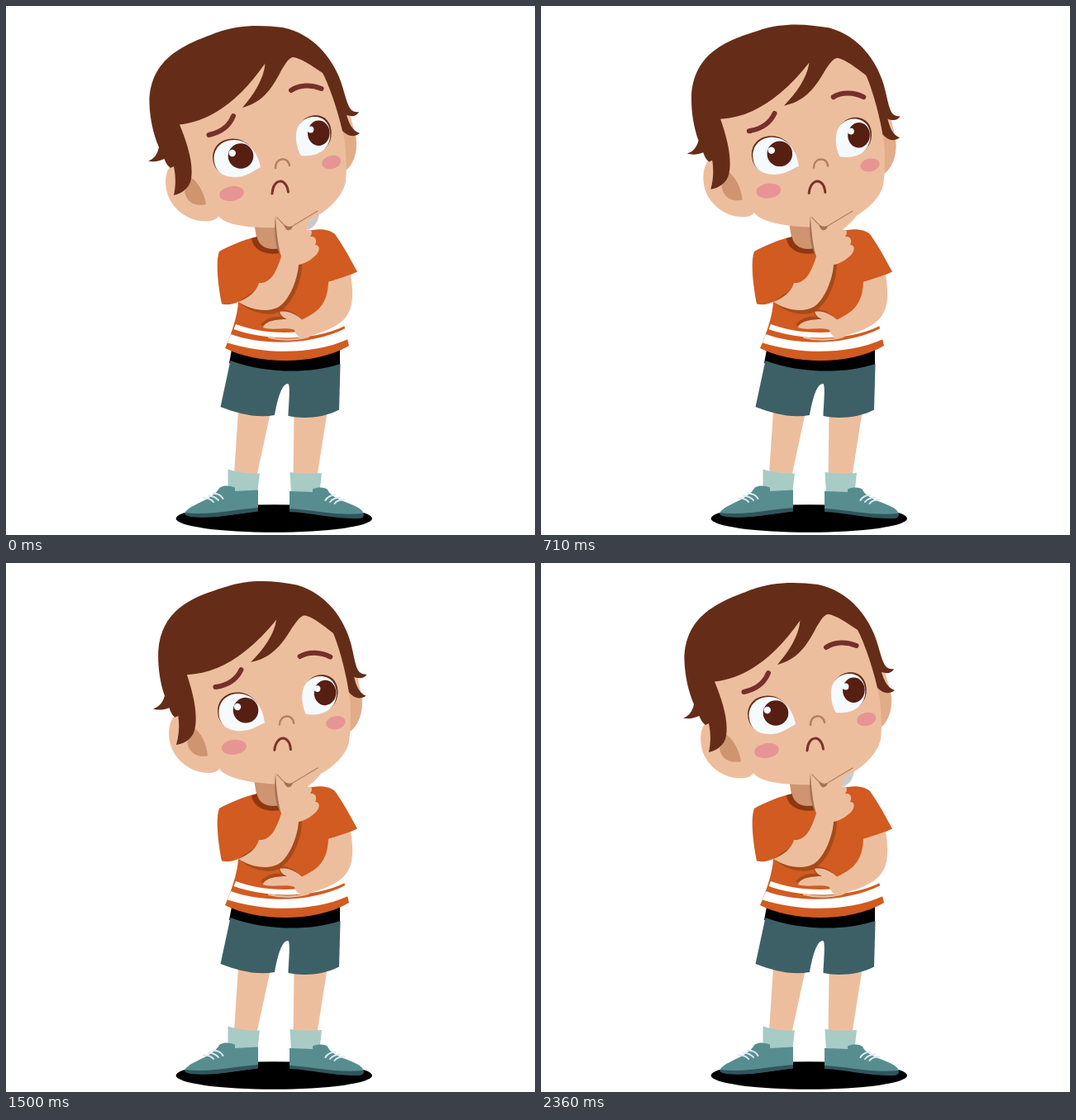
Animation, 640 px wide and 640 px high, one loop 2.43 s. Source, as an HTML page:

```html
<!DOCTYPE html>
<html lang="en">
<head>
<meta charset="utf-8">
<title>Thinking boy</title>
<style>
html, body { margin: 0; width: 100%; height: 100%; overflow: hidden; background: #fff; }
svg { display: block; width: 100vw; height: 100vh; }
.skin { fill: #edbe9e; }
.deep { fill: #cf9470; }
.hair { fill: #652d18; }
.shirt { fill: #d15b21; }
.shade { fill: #a64a1a; }
.white { fill: #fff; }
.eye { fill: #f5fafe; }
.iris { fill: #561f12; }
.cheek { fill: #e79594; }
.sock { fill: #a8cbc5; }
.shoe { fill: #588d8f; }
.sole { fill: #31545c; }
.line { fill: none; stroke-linecap: round; }
.brow { stroke: #75302a; stroke-width: 6; }
</style>
</head>
<body>
<svg viewBox="0 0 640 640">
  <defs>
    <path id="leftEye" d="M251.500 184C252 170 263 162 276 162C292 162 304 175 308 195C300 199 291 207 277 207C262 207 252 200 251.500 184Z"/>
    <path id="rightEye" d="M357 181C351 172 347 150 357 141C365 132 380 132 387 140C394 148 394 163 387 171C380 180 368 182 357 181Z"/>
  </defs>
  <ellipse cx="324.300" cy="620" rx="118.700" ry="16.800"/>

  <g id="legs">
    <path class="skin" d="M281 490L319.500 494L303.500 568L276 566ZM348.500 494L388.500 492L376.500 568L347.500 568Z"/>
    <path class="sock" d="M268.500 560.500Q285 566 307 565.500L304 590L268.500 588ZM343.500 564Q362 567 382 565L379 592L345 590Z"/>
    <path class="shoe" d="M216 614C221 603 246 600 257 585C259 580 268 579 277 582.500L277 587L305 585.500V611C280 614 250 621 224 617Z"/>
    <path class="sole" d="M215.500 613C245 617 275 609 305 607V611.500C280 614 250 621 224 618Q216 617 215.500 613Z"/>
    <path class="shoe" d="M343 587L371 588V584.500C378 581.500 386 582 389 585C394 598 420 601 429 609C433 612 434 617 430 619C400 621 370 612 343 611Z"/>
    <path class="sole" d="M343 608C375 610 400 617 432.500 614Q434 619 428 620C398 621 370 613 343 612Z"/>
    <path class="line" stroke="#dce9f2" stroke-width="2" d="M239 595.500Q247 595 251 600M245 592.500Q253 593 257 598M250 589.500Q259 590 262.500 596M409.500 597.500Q401 597 397.500 602M404 594.500Q396 595 392 600M398.500 591.500Q390 592 386.500 598"/>
    <path d="M273 416H404V438C360 448 310 444 270 432Z"/>
    <path fill="#3d6067" d="M271.500 429C312 444 365 446 404.500 433L403 488.500C385 498 360 500 341.500 496C342 482 344.500 457 341 457C333 457 328 478 325 495C302 499 281 493 259.500 485Z"/>
  </g>

  <g id="body">
    <path class="deep" d="M300 262H338V298C325 299 310 297 305 292Z"/>
    <path class="shirt" d="M258 297C272 289 288 283 300 280C304 296 318 299 332 296L362 273C378 268 392 270 398 276C408 290 416 305 425 321.500C414 327 402 331 390 334C392 350 400 365 407 377L415 411C370 437 300 432 265 414C272 398 280 376 281 358C275 361 268 362 261 360.500C257 340 253 310 258 297Z"/>
    <path fill="#8e3710" d="M297 281C299 296 315 302 332 299L331 293C318 296 306 292 303.500 279Z"/>
    <path class="white" d="M278 385C310 397 365 402 408 378L410 387C370 407 310 404 275.500 391ZM272 397C310 411 370 411 411.500 389.500L414 403C370 423 310 421 268 407.500Z"/>
  </g>

  <g id="lowerArm">
    <path class="shade" d="M308 386C314 377 325 375 333 376L327 366.500C340 366 351 371 358 380L340 390Z"/>
    <path class="line" stroke="#edbe9e" stroke-width="2" d="M318 401Q342 407 366 400"/>
    <path class="skin" d="M390 334L417 325C421 350 420 367 409 379C396 392 377 396 362 401C353 402 350 396 349 392C338 388 320 393 311 389C313 381 328 379 340 379C335 377 332 374 331 370C341 368 351 373 358 379.500C376 371 389 362 390 334Z"/>
  </g>

  <path id="rim" fill="#c8cbcc" d="M378.500 245C380 255 376 266 367 270H355L360 250Z"/>

  <g id="head">
    <path class="skin" d="M203 190C193 197 192 210 194 222C198 244 218 258 235 260C246 261 254 260 257 254C266 267 305 269 330 268C372 266 406 237 411 213L412 198C422 190 427 170 422 153L405 90L340 45L210 120Z"/>
    <path fill="#e2ac88" d="M406 148L422 153C427 170 422 190 412 198C411 184 412 166 406 148Z"/>
    <path class="deep" d="M223 207C232 212 240 226 242 240C229 243 219 238 216 225Z"/>
    <path class="hair" d="M203 229C206 215 205 204 203 194L199 196C195 193 193 189 191.500 185C185 188 179 189 172 187.500C179 185 183 180 185 171C178 155 174 135 173.500 118C173 62 219 46 250 34C280 22 308 23 335 26C373 34 394 64 403 86C410 104 412 120 418 126Q422 129 427 128C424 134 418 134 412 132C415 142 419 151 428 154C420 160 413 157 407 151C402 128 391 96 383 81C370 72 356 63 348 62C342 62 338 70 333 78C321 102 309 117 286 123C300 107 312 88 313.500 69.500C281 116 246 140 210 143.500C219 165 227 190 224 209C222 221 212 227 203 229Z"/>
    <use href="#leftEye" class="hair" x="-1.500" y="-1.500"/>
    <use href="#rightEye" class="hair" x="1.500" y="-1.800"/>
    <use href="#leftEye" class="eye"/>
    <use href="#rightEye" class="eye"/>
    <ellipse class="iris" cx="284" cy="181.500" rx="15.300" ry="15.300"/>
    <ellipse class="iris" cx="378.300" cy="153.700" rx="13.300" ry="15.200"/>
    <circle class="eye" cx="273.800" cy="178" r="4.200"/>
    <circle class="eye" cx="368.500" cy="149.500" r="3.900"/>
    <path class="line brow" d="M245.500 156C259 153 270 146 275 133"/>
    <path class="line brow" id="rightBrow" d="M345 102C355 95 370 95 381.500 100"/>
    <path class="line" stroke="#ba7e63" stroke-width="2.500" d="M326 196C325 184 341 181 343 193"/>
    <path class="line" stroke="#7a342b" stroke-width="3" d="M322 227C323 208 339 207 341.500 225"/>
    <ellipse class="cheek" cx="273" cy="227" rx="15" ry="9" transform="rotate(-10 273 227)"/>
    <ellipse class="cheek" cx="393.700" cy="189" rx="11.800" ry="8" transform="rotate(-14 393.700 189)"/>
  </g>

  <g id="thinkingArm">
    <path class="shade" d="M281 358L354 308L358 311C358 335 345 366 325 372C307 375 292 367 281 358Z"/>
    <path fill="#a27456" d="M326 254C324 270 325 288 331 300L336 298L332 262Z"/>
    <path id="hand" class="skin"/>
    <path class="line" stroke="#b08061" stroke-width="1.200" d="M328 256C333 261 337 267 342 268L347 266L377 248"/>
    <path fill="#a27456" d="M336 265Q342 268 347 266Q346 271 341 271.500Q338 270 336 265Z"/>
  </g>
</svg>
<script>
const LOOP = 2430, FPS = 14, LAST = 33, SWING = 4.8, BROW_DROP = 13;
const get = id => document.getElementById(id);
const head = get("head"), brow = get("rightBrow"), hand = get("hand"), rim = get("rim");

const fingertip = {
  long: "L376 248C383 245 385 250 380 256Q373 265 364 271",
  short: "L378 246C372 252 366 258 364 271"
};
const handPath = tip =>
  "M281 358C292 354 303 346 306 335C320 336 327 322 333 303" +
  "C329 290 327 272 326 254C332 257 337 266 342 268L347 266" + tip +
  "C371 269 371 275 368 279C376 278 376 285 374 289" +
  "C381 289 380 298 372 304C366 309 360 312 354 313" +
  "C353 330 343 356 330 364C316 372 295 367 281 358Z";

function draw(time) {
  const step = Math.min(LAST, Math.floor((time % LOOP + 5) * FPS / 1000));
  const lean = (1 - Math.cos(2 * Math.PI * step / LAST)) / 2;
  const atEnd = lean < 0.06 || lean > 0.88;
  head.setAttribute("transform", `rotate(${SWING * lean} 335 267)`);
  brow.setAttribute("transform", `translate(0 ${BROW_DROP * lean ** 1.4})`);
  hand.setAttribute("d", handPath(atEnd ? fingertip.short : fingertip.long));
  rim.setAttribute("visibility", atEnd ? "visible" : "hidden");
}

const start = performance.now();
function tick() {
  draw(performance.now() - start);
  requestAnimationFrame(tick);
}
tick();
</script>
</body>
</html>
```
